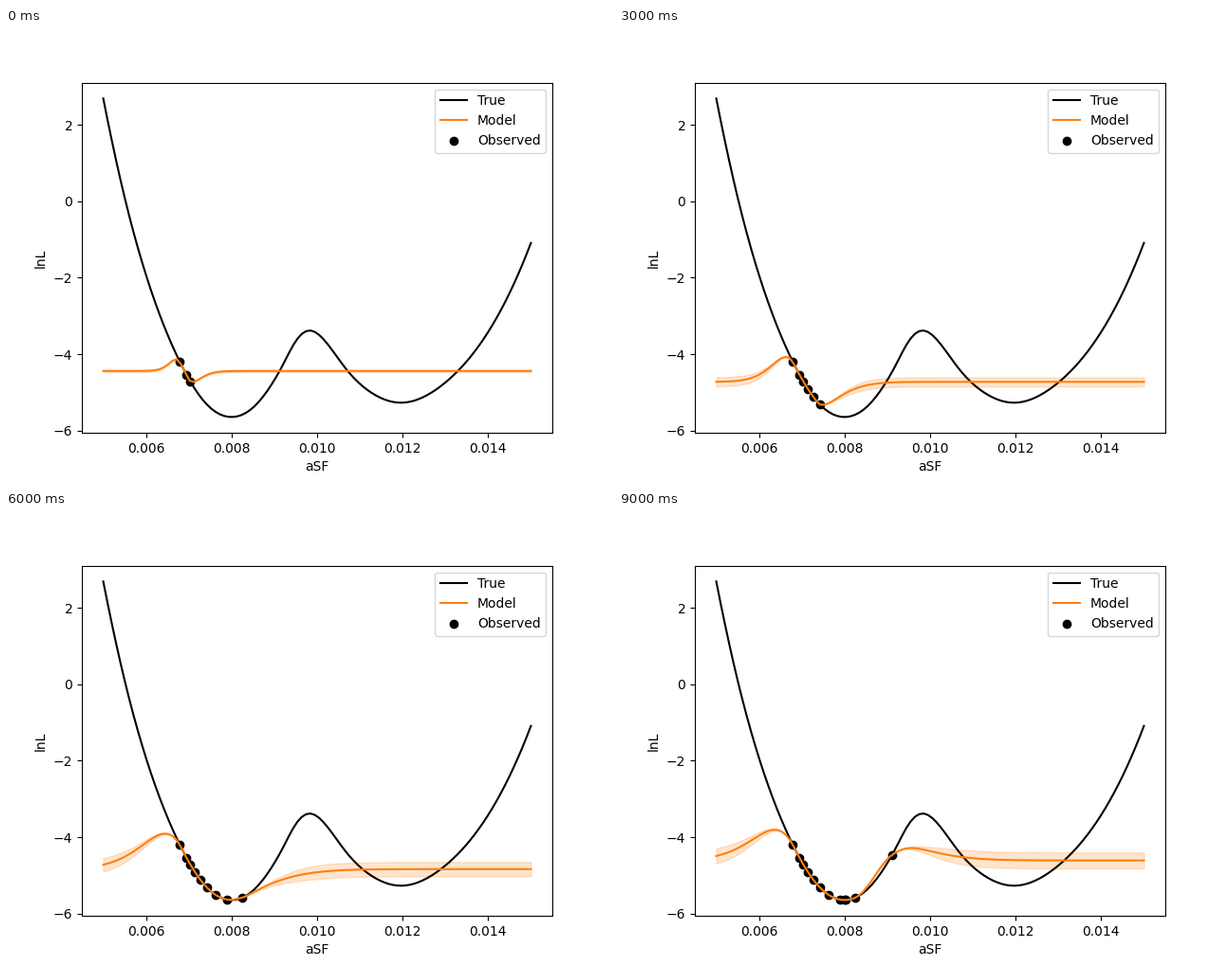
Animation, 640 px wide and 480 px high, one loop 10000 ms. Source, as a matplotlib script:

```python
import numpy as np
import matplotlib.pyplot as plt
from matplotlib.animation import FuncAnimation

# x is in units of 1e-3 throughout
KNOTS = [(4.6, 5.07), (5, 2.69), (5.5, 0.1), (6, -1.93), (6.784, -4.185),
         (7.4, -5.29), (8, -5.645), (8.5, -5.4), (8.87, -4.905), (9.2, -4.28),
         (9.5, -3.66), (9.823, -3.38), (10.155, -3.616), (10.665, -4.37),
         (11.3, -5.03), (11.95, -5.27), (12.9, -4.83), (14, -3.42),
         (15, -1.09), (15.5, 0.5)]
SAMPLES = np.array([6.784, 6.948, 7.035, 7.15, 7.272, 7.427, 7.627, 7.89,
                    8.25, 8.0, 8.02, 9.113])  # in the order they are observed
STEPS = 10
FLATTEN = 0.4  # share of the true slope the model keeps at its last sample


def natural_spline(knots):
    """Return the natural cubic spline through the knots."""
    kx, ky = np.array(knots).T
    n = len(kx)
    poly = np.column_stack([np.ones(n), kx])
    system = np.block([[np.abs(kx[:, None] - kx) ** 3, poly],
                       [poly.T, np.zeros((2, 2))]])
    coef = np.linalg.solve(system, np.append(ky, [0, 0]))

    def curve(x):
        x = np.atleast_1d(x)
        return (np.abs(x[:, None] - kx) ** 3 @ coef[:n]
                + coef[n] + coef[n + 1] * x)
    return curve


def fade(dist, scale, power):
    return np.exp(-(dist / scale) ** power)


true_curve = natural_spline(KNOTS)
grid = np.linspace(5, 15, 100)
truth = true_curve(grid)


def predict(step):
    """Model mean and band half-width: exact at samples, flat far away."""
    base = np.interp(step, [0, 3, 5, 8, 9], [-4.44, -4.725, -4.845, -4.82, -4.61])
    width = np.interp(step, [0, 5, 9], [0.03, 0.18, 0.21])
    scale = 0.18 + 0.42 * np.sin(np.pi / 2 * min(step / 6.5, 1)) ** 2
    reach = 1.75 * scale

    seen = np.sort(SAMPLES[:step + 3])
    first, prev, last = seen[0], seen[-2], seen[-1]
    left = np.clip(first - grid, 0, None)
    right = np.clip(grid - last, 0, None)
    low, edge, high = true_curve(last + np.array([-0.01, 0, 0.01]))
    slope = (high - low) / 0.02

    # Follow the truth, easing to the flattened slope over the last gap
    t = np.clip((grid - prev) / (last - prev), 0, 1)
    bulge = (1 - FLATTEN) * slope * (last - prev) * t ** 2 * (1 - t)
    inner = base + (truth - base) * fade(left, scale, 1.3) + bulge

    climb = FLATTEN * slope * reach / 2 * np.tanh(2 * right / reach)
    outer = base + (edge - base + climb) * fade(right, reach, 1.4)

    mean = np.where(right > 0, outer, inner)
    return mean, width * (1 - fade(left + right, reach, 2))


fig, ax = plt.subplots(figsize=(6.4, 4.8), dpi=100)
xs = grid / 1000
ax.plot(xs, truth, color="black", label="True")
model, = ax.plot(xs, truth, color="tab:orange", label="Model")
dots = ax.scatter([], [], color="black", label="Observed")
ax.set_xlim(0.0045, 0.0155)
ax.set_ylim(-6.0615, 3.105)
ax.set_xlabel("aSF")
ax.set_ylabel("lnL")
ax.legend(loc="upper right")
bands = []


def draw(step):
    mean, half = predict(step)
    seen = SAMPLES[:step + 3]
    model.set_ydata(mean)
    dots.set_offsets(np.column_stack([seen / 1000, true_curve(seen)]))
    while bands:
        bands.pop().remove()
    bands.append(ax.fill_between(xs, mean - half, mean + half,
                                 color="tab:orange", alpha=0.2))
    return model, dots, bands[0]


anim = FuncAnimation(fig, draw, frames=STEPS, init_func=lambda: draw(0),
                     interval=1000, repeat=True, repeat_delay=0, blit=False)
plt.show()
```
